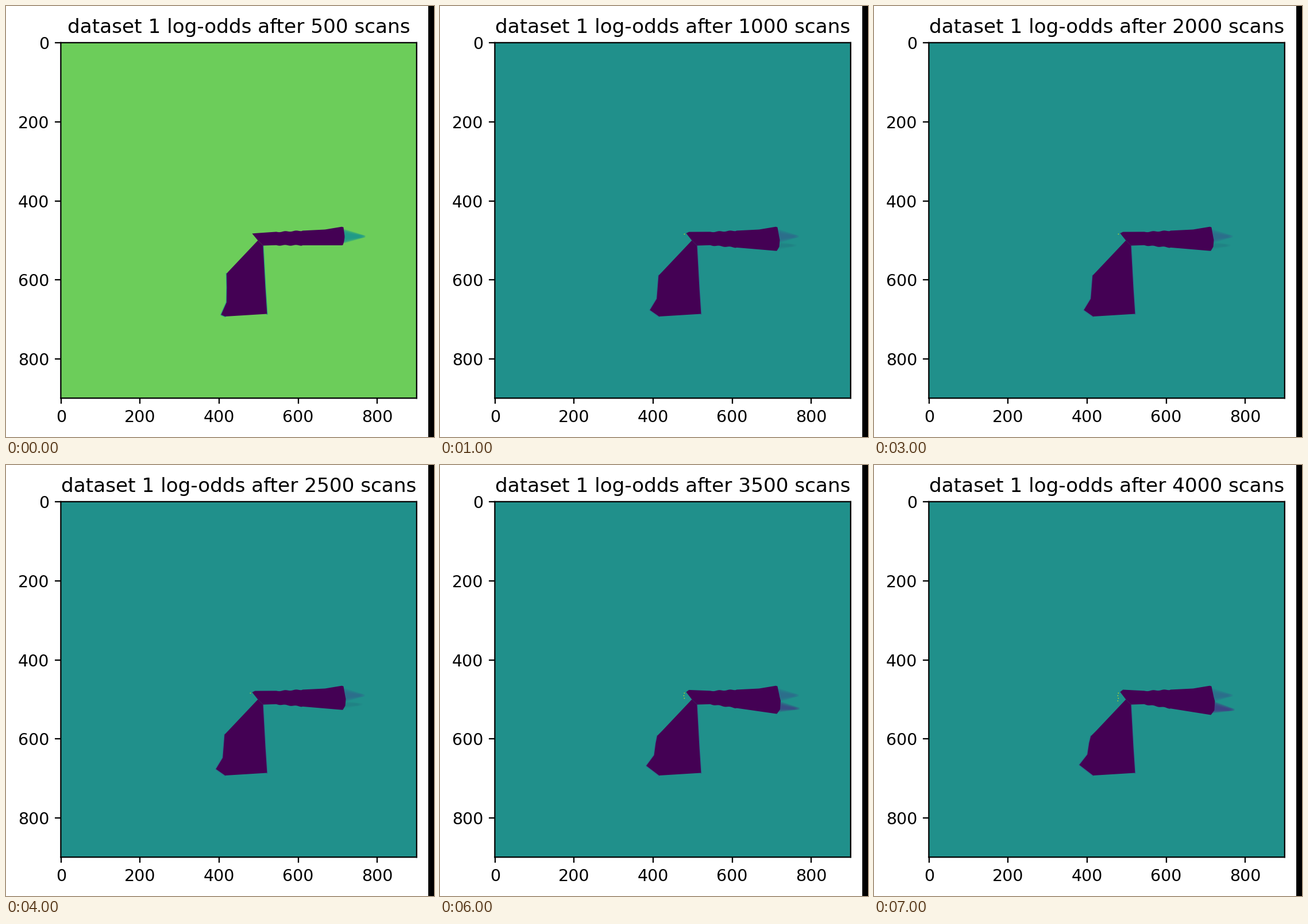
Write a matplotlib script that moves like this. It is 745 by 751 pixels and loops after 8 s.

```python
import numpy as np
import matplotlib.pyplot as plt
from matplotlib.animation import FuncAnimation
from matplotlib.lines import Line2D
from matplotlib.patches import Circle, Polygon, Rectangle
from matplotlib.transforms import Affine2D

W, H, DPI = 745, 751, 200
K = 1.029  # scale of the default point sizes
LEFT, RIGHT, TOP, BOTTOM = 95.4, 714.8, 63.9, 683.3

GREEN, TEAL, PURPLE = "#6ccd5a", "#20908b", "#440154"
AQUA, BLUE, INDIGO, YELLOW = "#1f9a8a", "#2f6b8e", "#433e85", "#d8e219"

plt.rcParams.update({
    "font.family": "DejaVu Sans",
    "font.size": 10 * K,
    "axes.titlesize": 12 * K,
    "axes.titlepad": 6 * K,
    "axes.linewidth": 0.8 * K,
})

fig = plt.figure(figsize=((W + 0.01) / DPI, (H + 0.01) / DPI), dpi=DPI, facecolor="white")
px = Affine2D().scale(1 / W, -1 / H).translate(0, 1) + fig.transFigure
cells = Affine2D().translate(0.4, 0.5) + px

ax = fig.add_axes([LEFT / W, 1 - BOTTOM / H, (RIGHT - LEFT) / W, (BOTTOM - TOP) / H])
ax.set(xlim=(-0.5, 899.5), ylim=(899.5, -0.5),
       xticks=range(0, 900, 200), yticks=range(0, 900, 200))
ax.tick_params(length=3.5 * K, width=0.8 * K, pad=3.5 * K)
for spine in ax.spines.values():
    spine.set_snap(False)
fig.add_artist(Rectangle((735, 0), 10, H, color="black", lw=0, transform=px))

drawn = []


def put(artist, z):
    artist.set_transform(cells)
    artist.set_zorder(z)
    ax.add_artist(artist)
    drawn.append(artist)


def growth(scans):
    """Share of the swept area seen so far; it rests between 1000 and 2500 scans."""
    return np.interp(scans, [500, 1000, 2500, 3000, 4000], [0, 0.53, 0.53, 0.8, 1])


def arm(g):
    x = np.arange(470, 585, 2)
    ripple = 0.7 * np.sin(x / 3) * (x < 515)
    upper = np.column_stack([x, np.interp(x, [440, 555, 585], [394.7, 389, 384]) + ripple])
    lower = np.column_stack([x, 416.5 + g * 18.5 * (x - 470) / 116 + ripple])
    end = [(587, 385), (589 + 2 * g, 400 + 4 * g), (589 + 4 * g, 403 + 8 * g),
           (588 + 4 * g, 410 + 17 * g), (586, 416 + 19 * g)]
    start = [(447, 417), (438, 408), (428, 396 - g), (433, 395.5 - 4.5 * g)]
    return np.vstack([upper, end, lower[::-1], start])


def leg(g):
    right = [(447, 417), (451, 490), (454, 536)]
    left = [(381, 540.5), (374 - 17 * g, 537.5 - 15.5 * g), (383.5 - 12.5 * g, 516 - 12 * g),
            (384 - 10 * g, 490 - 6 * g), (383.5 - 6.5 * g, 466 + 6 * g), (386, 463)]
    return right, left


def plume(x, top, bottom, apex, color, alpha, layers=7):
    """Soft tip, densest along its core."""
    ax_, ay = apex
    core = (top + bottom + ay) / 3
    for s in np.linspace(1, 0.3, layers):
        tip = x + (ax_ - x) * (0.6 + 0.4 * s)
        points = [(x, core + (top - core) * s), (tip, ay - 1.5),
                  (tip, ay + 1.5), (x, core + (bottom - core) * s)]
        put(Polygon(points, facecolor=color, lw=0, alpha=alpha), 1)


def draw(i):
    while drawn:
        drawn.pop().remove()
    scans = 500 * (i + 1)
    first = scans == 500
    g = growth(scans)
    ax.set_title(f"dataset 1 log-odds after {scans} scans")
    ax.set_facecolor(GREEN if first else TEAL)

    if first:
        plume(587, 388, 413, (625, 401), AQUA, 0.42)
    else:
        plume(587, 388, 413, (624, 401), BLUE, 0.25)
        plume(588, 410, 416 + 16 * g, (613 + 14 * g, 406 + 20 * g), INDIGO, 0.3 * g ** 4)

    right, left = leg(g)
    for side in (right, left[:-1]):
        put(Line2D(*np.transpose(side), color=AQUA if first else BLUE, lw=0.9, alpha=0.8), 1.1)
    put(Polygon(right + left + [(438, 408)], facecolor=PURPLE, lw=0), 1.2)
    put(Polygon(arm(g), facecolor=PURPLE, lw=0), 1.2)

    for k in range(round(4 * g ** 3)):
        put(Circle((425 - k % 2, 397 + 4.5 * k), 0.8, facecolor=YELLOW, lw=0), 1.3)
    return drawn


anim = FuncAnimation(fig, draw, frames=8, interval=1000, repeat=True, repeat_delay=0,
                     init_func=lambda: draw(0), blit=False)
plt.show()
```
